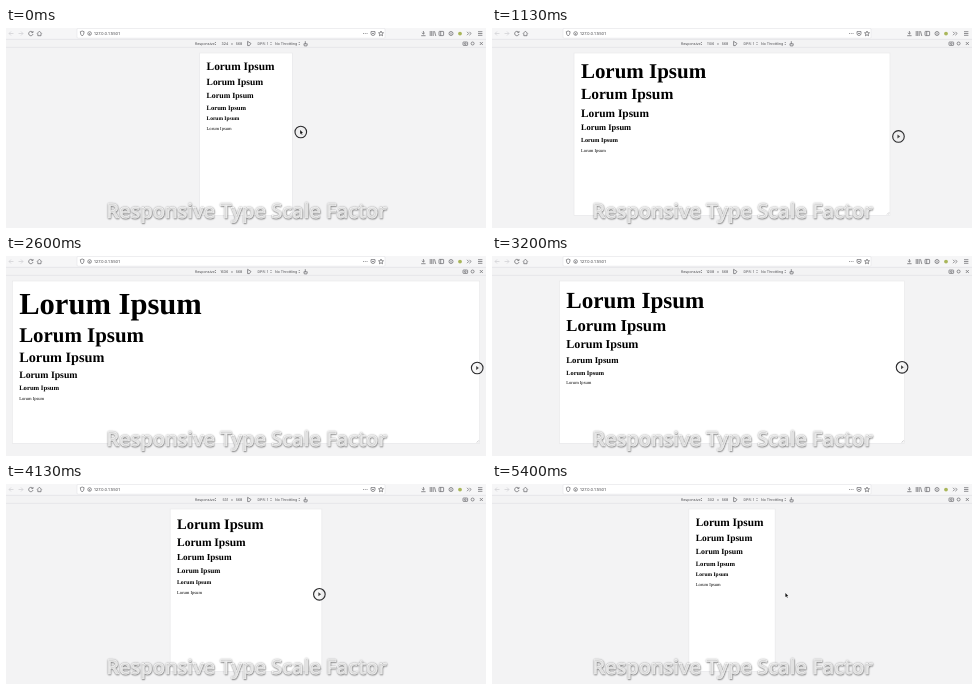
An HTML page for the animation above (5.67 s loop, 480 px wide and 200 px high).

```html
<!DOCTYPE html>
<html lang="en">
<head>
<meta charset="utf-8">
<title>Responsive Type Scale Factor</title>
<style>
  html, body { margin: 0; width: 100%; height: 100%; overflow: hidden; background: #f3f3f4; }
  svg { display: block; width: 100vw; height: 100vh; }
  text { text-rendering: geometricPrecision; }
  .ui text { font: 3.6px Inter, "Open Sans", sans-serif; fill: #4a4a4e; }
  .ui .url { font-size: 4.1px; }
  .icon { fill: none; stroke: #6c6c70; stroke-width: .75; }
  .faint { stroke: #d0d0d4; }
  #type text { font-family: "Liberation Serif", "Times New Roman", serif; font-weight: bold; fill: #000; }
  #type text:last-child { font-weight: normal; }
  .caption {
    font: 600 20px "Open Sans", "Noto Sans", sans-serif; fill: #fff;
    stroke: #fff; stroke-width: .5;
    text-shadow: 0 0 2px rgba(0,0,0,.3), .5px .5px 1.5px rgba(0,0,0,.3);
  }
</style>
</head>
<body>
<svg viewBox="0 0 480 200">
  <rect width="480" height="200" fill="#f3f3f4"/>
  <g class="ui">
    <rect width="480" height="11" fill="#f6f6f7"/>
    <rect x="71" y=".4" width="308" height="9.8" rx="1" fill="#fff" stroke="#dcdce0" stroke-width=".5"/>
    <path d="M0 11.3H480M0 19.3H480" stroke="#dcdcdf" stroke-width=".6"/>

    <path class="icon faint" d="M7.5 5.5H3M5 3.5 3 5.5 5 7.5M12.5 5.5H17M15 3.5 17 5.5 15 7.5"/>
    <path class="icon" d="M26.6 4.2A2.2 2.2 0 1 0 27 6M27 3V4.6H25.3"/>
    <path class="icon" d="M31 5.6 33.4 3.2 35.8 5.6M31.8 5.3V7.7H35V5.3"/>
    <path class="icon" d="M74.3 3.7 76.2 3 78.1 3.7Q78.1 6.8 76.2 8 74.3 6.8 74.3 3.7Z"/>
    <circle class="icon" cx="83.6" cy="5.5" r="1.8"/>
    <path class="icon" d="M83.6 5V6.7"/>
    <text class="url" x="88" y="7">127.0.0.1:5501</text>
    <path class="icon" d="M357 5.5H361.5" stroke-dasharray=".9 .9"/>
    <path class="icon" d="M365 3.6H369V5.5Q369 7.5 367 7.5 365 7.5 365 5.5ZM366 5 367 6 368 5"/>
    <path class="icon" d="M375 3 375.7 4.7 377.5 4.8 376.1 6 376.6 7.8 375 6.8 373.4 7.8 373.9 6 372.5 4.8 374.3 4.7Z"/>

    <path class="icon" d="M417.4 3V6M416 4.8 417.4 6.2 418.8 4.8M415.2 7.7H419.6"/>
    <path class="icon" d="M424.2 3V8M425.7 3V8M427.2 3V8M428.5 3.2 429.8 8"/>
    <rect class="icon" x="433" y="3.4" width="4.6" height="4.2" rx=".5"/>
    <path class="icon" d="M434.7 3.4V7.6"/>
    <circle class="icon" cx="445" cy="5.5" r="2"/>
    <path class="icon" d="M445 4.6V6.6"/>
    <circle cx="454" cy="5.6" r="1.9" fill="#a9b65a"/>
    <path class="icon" d="M461 3.8 462.7 5.5 461 7.2M463.4 3.8 465.1 5.5 463.4 7.2"/>
    <path class="icon" d="M472 3.7H476.4M472 5.5H476.4M472 7.3H476.4"/>

    <text x="189" y="16.8">Responsive</text>
    <text id="width" x="222.3" y="16.8" text-anchor="end"></text>
    <text x="226" y="16.8" text-anchor="middle">×</text>
    <text x="229.7" y="16.8">568</text>
    <path class="icon" d="M241.6 13.3V17.6H243.4L245 15.5Z"/>
    <text x="251.5" y="16.8">DPR: 1</text>
    <text x="269" y="16.8">No Throttling</text>
    <path id="arrows" d="M208.7 15 209.4 14 210.1 15ZM208.7 16 209.4 17 210.1 16Z" fill="#5c5c60"/>
    <use href="#arrows" x="55.6"/>
    <use href="#arrows" x="83.8"/>
    <path class="icon" d="M299.3 16V13.2M298.3 17.9 297.9 15.8 301.3 15.8 300.9 17.9Z"/>
    <rect class="icon" x="457" y="14" width="4.6" height="3.4" rx=".5"/>
    <circle class="icon" cx="459.3" cy="15.7" r=".8"/>
    <circle class="icon" cx="466.6" cy="15.5" r="1.5"/>
    <path class="icon" d="M473.8 14 476.8 17M476.8 14 473.8 17"/>
  </g>

  <rect id="page" y="25" height="162.3" fill="#fff" stroke="#e6e6e8" stroke-width=".6"/>
  <path id="grip" d="M-3 -.8 -.8 -3M-1.6 -.8 -.8 -1.6" stroke="#a5a5a8" stroke-width=".5"/>
  <g id="type"></g>

  <text class="caption" x="240.5" y="190" text-anchor="middle">Responsive Type Scale Factor</text>

  <g id="cursor">
    <circle id="ring" r="5.8" fill="#e4e4e6" fill-opacity=".3" stroke="#2a2a2c" stroke-width="1.1"/>
    <path id="pointer" d="M-.6 -2V2L.4 1.2 1.1 2.8 1.7 2.5 1 .9H2.2Z" fill="#111"/>
    <path id="resize" d="M-1 -2V2L1.7 0Z" fill="#444"/>
  </g>
</svg>
<script>
const LOOP = 5670, FPS = 15, PX = 0.2857, REM = 16 * PX;
const SHRINK = 2600, RELEASE = 5133;

const $ = id => document.getElementById(id);
const set = (el, attrs) => { for (const k in attrs) el.setAttribute(k, attrs[k]); };
const clamp = u => Math.min(1, Math.max(0, u));
const mix = (a, b, u) => a + (b - a) * u;

// Cubic from 0 to 1 that sets off at the given speed and comes to rest
function glide(u, speed) {
  u = clamp(u);
  return speed * u * (1 - u) ** 2 + u * u * (3 - 2 * u);
}

// How far the page is pulled open; the type settles later than the page
const opening = t => glide(t / 2220, 0.655);
const pageOpen = t => t < SHRINK ? opening(t) : 1 - glide((t - SHRINK) / 2260, 1.025);
const typeOpen = t => t < SHRINK ? opening(t) : 1 - glide((t - SHRINK) / 2500, 1.14);

// The hand leads the page edge, then slips off it on release
function hand(t, edge, open) {
  if (t < SHRINK) return [Math.min(473, edge + 8.5), mix(104, 111.5, open)];
  const u = clamp((t - RELEASE) / 267);
  return [mix(edge - 2.5, 294, u), mix(110, 112, open) + u - 9 * Math.sin(Math.PI * u)];
}

const lines = Array.from({ length: 6 }, () => {
  const line = document.createElementNS("http://www.w3.org/2000/svg", "text");
  line.textContent = "Lorum Ipsum";
  return $("type").appendChild(line);
});

function draw(time) {
  const t = Math.floor(time * FPS / 1000 + 0.1) * 1000 / FPS;
  const open = pageOpen(t);
  const width = mix(t < SHRINK ? 324 : 302, 1636, open);
  const w = width * PX, left = 240 - w / 2, right = 240 + w / 2;

  $("width").textContent = Math.round(width);
  set($("page"), { x: left, width: w });
  set($("grip"), { transform: `translate(${right} 187.3)` });

  const ratio = mix(1.2, 1.4625, typeOpen(t));
  let top = 32.6;
  lines.forEach((line, i) => {
    const size = REM * ratio ** (5 - i);
    set(line, { x: left + 1.5 * REM, y: top + size * 0.83, "font-size": size });
    top += size + 5;
  });

  const dragging = t > 610 && t < RELEASE;
  set($("cursor"), { transform: `translate(${hand(t, right, open)})` });
  set($("ring"), { opacity: clamp((5400 - t) / 200) });
  set($("resize"), { opacity: +dragging });
  set($("pointer"), { opacity: +!dragging });
}

const start = performance.now();
function loop() {
  draw((performance.now() - start) % LOOP);
  requestAnimationFrame(loop);
}
loop();
</script>
</body>
</html>
```
